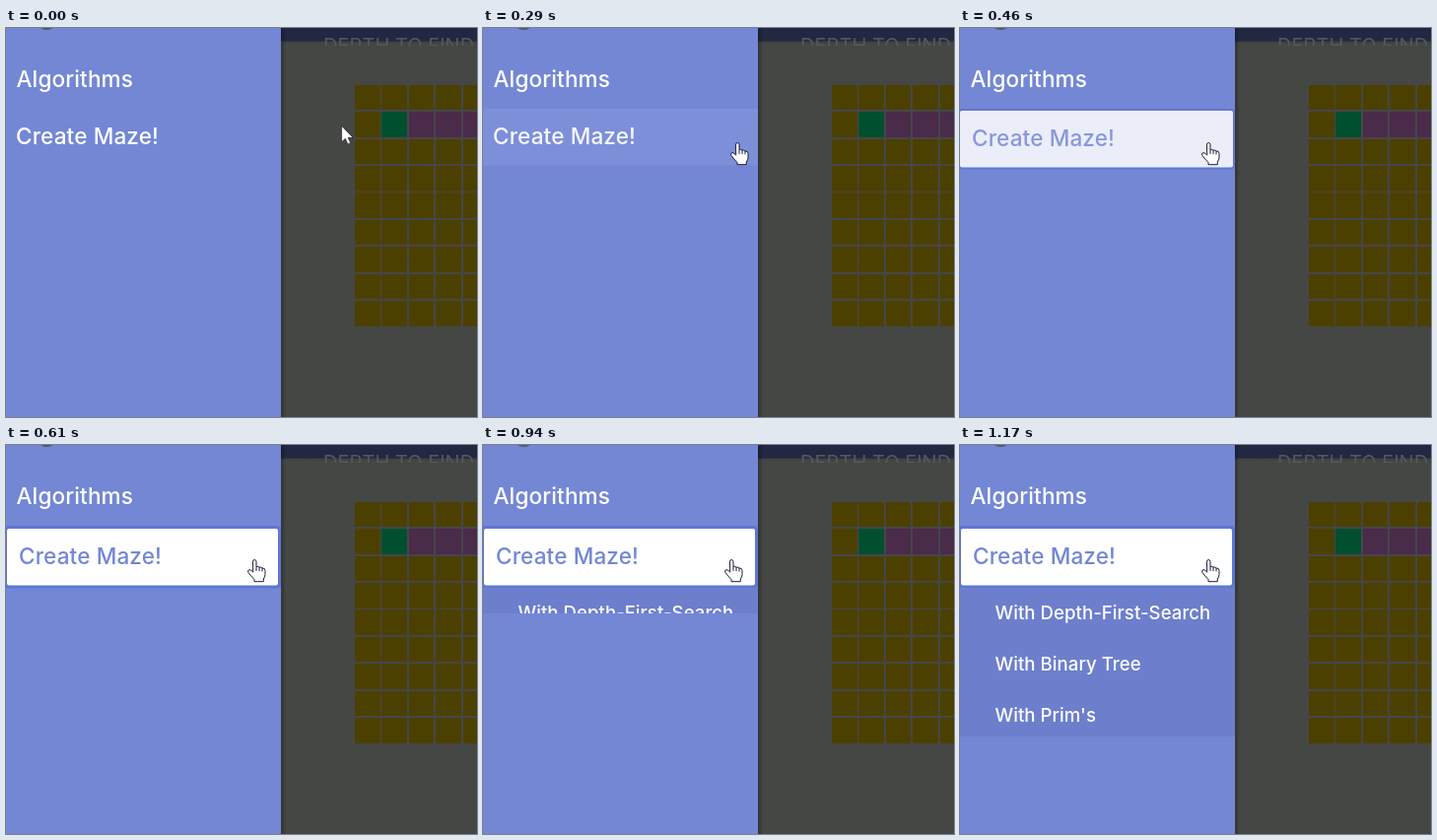
An HTML page for the animation above (1.64 s loop, 478 by 395 pixels).

```html
<!DOCTYPE html>
<html lang="en">
<head>
<meta charset="utf-8">
<title>Maze menu</title>
<style>
  html, body { margin: 0; width: 100%; height: 100%; overflow: hidden; background: #454745; }
  svg { display: block; width: 478px; height: 395px; }
  text { font-family: Poppins, Inter, "Open Sans", sans-serif; fill: #fff; white-space: pre; }
  .item { font-size: 22.6px; font-weight: 500; letter-spacing: .1px; }
  .sub { font-size: 18.6px; font-weight: 500; letter-spacing: .05px; }
  .title { font-size: 20.1px; font-weight: 400; fill: #54575d; }
  .cursor { stroke-linejoin: round; stroke-linecap: round; }
</style>
</head>
<body>
<svg viewBox="0 0 478 395">
  <defs>
    <linearGradient id="edge">
      <stop offset=".4" stop-color="#000" stop-opacity=".2"/>
      <stop offset="1" stop-color="#000" stop-opacity="0"/>
    </linearGradient>
    <linearGradient id="under" x2="0" y2="1">
      <stop offset="0" stop-color="#000" stop-opacity=".1"/>
      <stop offset="1" stop-color="#000" stop-opacity="0"/>
    </linearGradient>
    <clipPath id="titleClip"><rect x="279" y="0" width="199" height="18"/></clipPath>
    <clipPath id="subClip"><rect id="subMask" x="0" y="145" width="279" height="0"/></clipPath>
  </defs>

  <!-- dimmed page -->
  <rect width="478" height="395" fill="#454745"/>
  <rect width="478" height="13.5" fill="#222842"/>
  <rect y="13.5" width="478" height="3" fill="url(#under)"/>
  <g clip-path="url(#titleClip)">
    <text class="title" x="322" y="24.5">DEPTH TO FIND</text>
  </g>
  <g id="grid" shape-rendering="crispEdges"></g>
  <rect x="279" width="5" height="395" fill="url(#edge)"/>

  <!-- sidebar -->
  <rect width="279" height="395" fill="#7387d5"/>
  <circle cx="41.3" cy="-9" r="11" fill="#4f5c64"/>
  <text class="item" x="10.5" y="60">Algorithms</text>
  <rect id="frame" x="-2" y="82" width="281" rx="4" fill="#5f76d4"/>
  <rect id="row" rx="2"/>
  <text class="item"><tspan id="maze">Create Maze!</tspan></text>
  <g clip-path="url(#subClip)">
    <rect y="145" width="279" height="151" fill="#6d7fcc"/>
    <text class="sub" x="35.5" y="177">With Depth-First-Search</text>
    <text class="sub" x="35.5" y="229">With Binary Tree</text>
    <text class="sub" x="35.5" y="281">With Prim's</text>
  </g>

  <!-- pointers -->
  <path id="arrow" class="cursor" fill="#fff" stroke="#222" stroke-width=".7"
    d="M0 0V16.2L3.8 12.7L6.3 18.4L9 17.2L6.5 11.7H11.3Z"/>
  <g id="hand" class="cursor" stroke="#1b1b3c">
    <path fill="#fff" d="M5.5 2.5Q5.5 .5 7.3 .5Q9 .5 9 2.5V7.5Q11 6.8 12 8.2Q14 7.6 15 9Q18 8.6 18 11.5V15.5Q18 18 16.3 20V22.7H7V20.5Q3.5 17 .8 13.2Q0 11 2 10.6Q4 10.8 5.5 12.8Z"/>
    <path fill="none" d="M9 8V11.5M12 8.5V11.7M15 9.5V12"/>
  </g>
  <circle id="click" cx="250" cy="116" r="15" fill="#fffc84" style="mix-blend-mode:multiply"/>
</svg>

<script>
const LOOP = 1640;
const $ = id => document.getElementById(id);

function set(id, attrs) {
  for (const key in attrs) $(id).setAttribute(key, attrs[key]);
}

// Each track is a list of [time, ...values], held until the next entry.
const pointer = [
  [0, 340.6, 99.6], [70, 337, 101], [140, 324, 105], [220, 303, 109],
  [290, 251, 116], [390, 245, 116]
];
const hover = [   // progress, border width
  [0, 0, 0], [290, .07, 0], [390, .56, 1], [460, .86, 2], [540, .97, 2], [610, 1, 3]
];
const press = [[0, 0], [690, 1], [940, 0]];
const opened = [[0, 0], [940, 26], [1020, 104], [1090, 135], [1170, 151]];

function at(track, t) {
  let step = track[0];
  for (const next of track) if (next[0] <= t) step = next;
  return step.slice(1);
}

const blue = [115, 135, 213], white = [255, 255, 255];
const mix = (a, b, p) => `rgb(${a.map((v, i) => Math.round(v + (b[i] - v) * p))})`;

function buildGrid() {
  const pitch = 27.4, size = 25.6, left = 354, top = 57.8;
  let cells = `<rect x="${left}" y="${top}" width="124" height="${8 * pitch + size}" fill="#45464a"/>`;
  for (let r = 0; r < 9; r++) {
    for (let c = 0; c < 5; c++) {
      const fill = r !== 1 || c === 0 ? "#4c4000" : c === 1 ? "#005030" : "#4a2b4a";
      cells += `<rect x="${left + c * pitch}" y="${top + r * pitch}" width="${size}" height="${size}" fill="${fill}"/>`;
    }
  }
  $("grid").innerHTML = cells;
}

function render(t) {
  const [x, y] = at(pointer, t);
  const isHand = t >= 290;
  set("arrow", { transform: `translate(${x} ${y})`, opacity: isHand ? 0 : 1 });
  set("hand", { transform: `translate(${x} ${y})`, opacity: isHand ? 1 : 0 });

  const [p, b] = at(hover, t);
  set("frame", { height: 57.5 + 2 * b, opacity: b ? p : 0 });
  set("row", {
    x: b - 2, y: 82 + b, width: 281 - 2 * b, height: 57.5,
    rx: b ? 2 : 0, fill: mix(blue, white, p)
  });
  set("maze", { x: 10 + b, y: 118 + b, fill: mix(white, blue, p) });

  set("click", { opacity: at(press, t)[0] });
  set("subMask", { height: at(opened, t)[0] });
}

buildGrid();
render(0);
const start = performance.now();
(function tick() {
  render((performance.now() - start) % LOOP);
  requestAnimationFrame(tick);
})();
</script>
</body>
</html>
```
